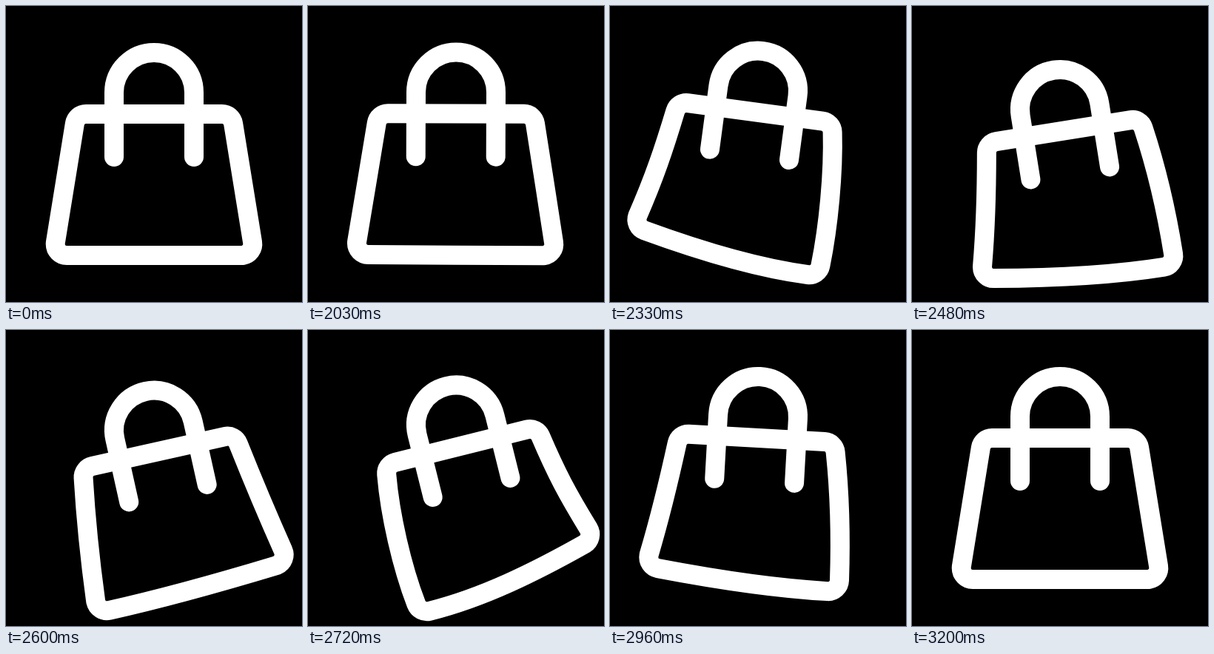
These frames come from a looping animation (400x400 px, 3.23 s). An HTML page with a canvas:

```html
<!DOCTYPE html>
<html lang="en">
<head>
<meta charset="utf-8">
<title>Swinging bag</title>
<style>
  html, body { margin: 0; height: 100%; overflow: hidden; background: #000; }
  canvas { display: block; width: 100vw; height: 100vh; }
</style>
</head>
<body>
<canvas id="stage" width="400" height="400"></canvas>
<script>
const ctx = document.getElementById('stage').getContext('2d');
const LOOP = 3230, START = 2000, STEP = 30;
const R = 15.3, SLANT = 0.16, HALF = Math.PI / 2;

// [step, value] keys
const TILT = [[0.5, 0], [8, 14.3], [16, -9.1], [24, -14], [32, 3.2], [40, 0]];
const LIFT = [[0.5, 0], [6.5, -24], [16, 23], [24, 11.5], [32, 0], [40, 0]];
const BEND = [[0.5, 0], [6, 1], [8, 1.05], [16, 0.7], [24, -1.22], [32, 0.6], [35, 0.8], [40, 0]];

// Monotone cubic interpolation: flat at turning points, smooth elsewhere
function sample(keys, x) {
  const last = keys.length - 1;
  if (x <= keys[0][0]) return keys[0][1];
  if (x >= keys[last][0]) return keys[last][1];
  const slope = i => (keys[i + 1][1] - keys[i][1]) / (keys[i + 1][0] - keys[i][0]);
  const tangent = i => {
    if (i === 0 || i === last) return 0;
    const a = slope(i - 1), b = slope(i);
    return a * b > 0 ? 2 * a * b / (a + b) : 0;
  };
  const i = keys.findIndex(k => k[0] > x) - 1;
  const [x0, y0] = keys[i], [x1, y1] = keys[i + 1];
  const w = x1 - x0, p = (x - x0) / w, q = 1 - p;
  return y0 * (1 + 2 * p) * q * q + y1 * p * p * (3 - 2 * p)
    + w * (tangent(i) * p * q * q - tangent(i + 1) * p * p * q);
}

// Curve between two round corners, leaving and arriving along their tangents
function edge(c0, a0, c1, a1, reach) {
  const at = (c, a, d) => [
    c[0] + R * Math.cos(a) - d * Math.sin(a),
    c[1] + R * Math.sin(a) + d * Math.cos(a)
  ];
  ctx.bezierCurveTo(...at(c0, a0, reach), ...at(c1, a1, -reach), ...at(c1, a1, 0));
}

function drawBody(bend) {
  // The corner the base swings towards rises; the other one tucks in and drops
  const corner = side => {
    const pulled = side * bend < 0;
    return {
      top: [92 * side, 44.3],
      bottom: [118 * side - bend * (pulled ? 6 : 18.5), 204.7 + bend * (15 * side + 2.5)],
      wall: bend * (pulled ? 0.12 : 0.23),
      floor: bend * (pulled ? 0.22 : 0)
    };
  };
  const l = corner(-1), r = corner(1);
  const right = -SLANT, left = Math.PI + SLANT;

  ctx.beginPath();
  ctx.arc(...r.top, R, -HALF, right);
  edge(r.top, right, r.bottom, right + r.wall, 55);
  ctx.arc(...r.bottom, R, right + r.wall, HALF + r.floor);
  edge(r.bottom, HALF + r.floor, l.bottom, HALF + l.floor, 75);
  ctx.arc(...l.bottom, R, HALF + l.floor, left + l.wall);
  edge(l.bottom, left + l.wall, l.top, left, 55);
  ctx.arc(...l.top, R, left, 3 * HALF);
  ctx.closePath();
  ctx.stroke();
}

function drawHandle() {
  ctx.beginPath();
  ctx.moveTo(-54, 87);
  ctx.arc(0, 0, 54, Math.PI, 0);
  ctx.lineTo(54, 87);
  ctx.stroke();
}

function draw(now) {
  const step = Math.max(0, Math.floor((now % LOOP - START) / STEP));
  ctx.setTransform(1, 0, 0, 1, 0, 0);
  ctx.fillStyle = '#000';
  ctx.fillRect(0, 0, 400, 400);
  ctx.translate(200, 117 + sample(LIFT, step));
  ctx.rotate(sample(TILT, step) * Math.PI / 180);
  ctx.strokeStyle = '#fff';
  ctx.lineWidth = 26;
  ctx.lineCap = 'round';
  drawBody(sample(BEND, step));
  drawHandle();
  requestAnimationFrame(animate);
}

let begin;
function animate(now) {
  begin ??= now;
  draw(now - begin);
}
draw(0);
</script>
</body>
</html>
```
